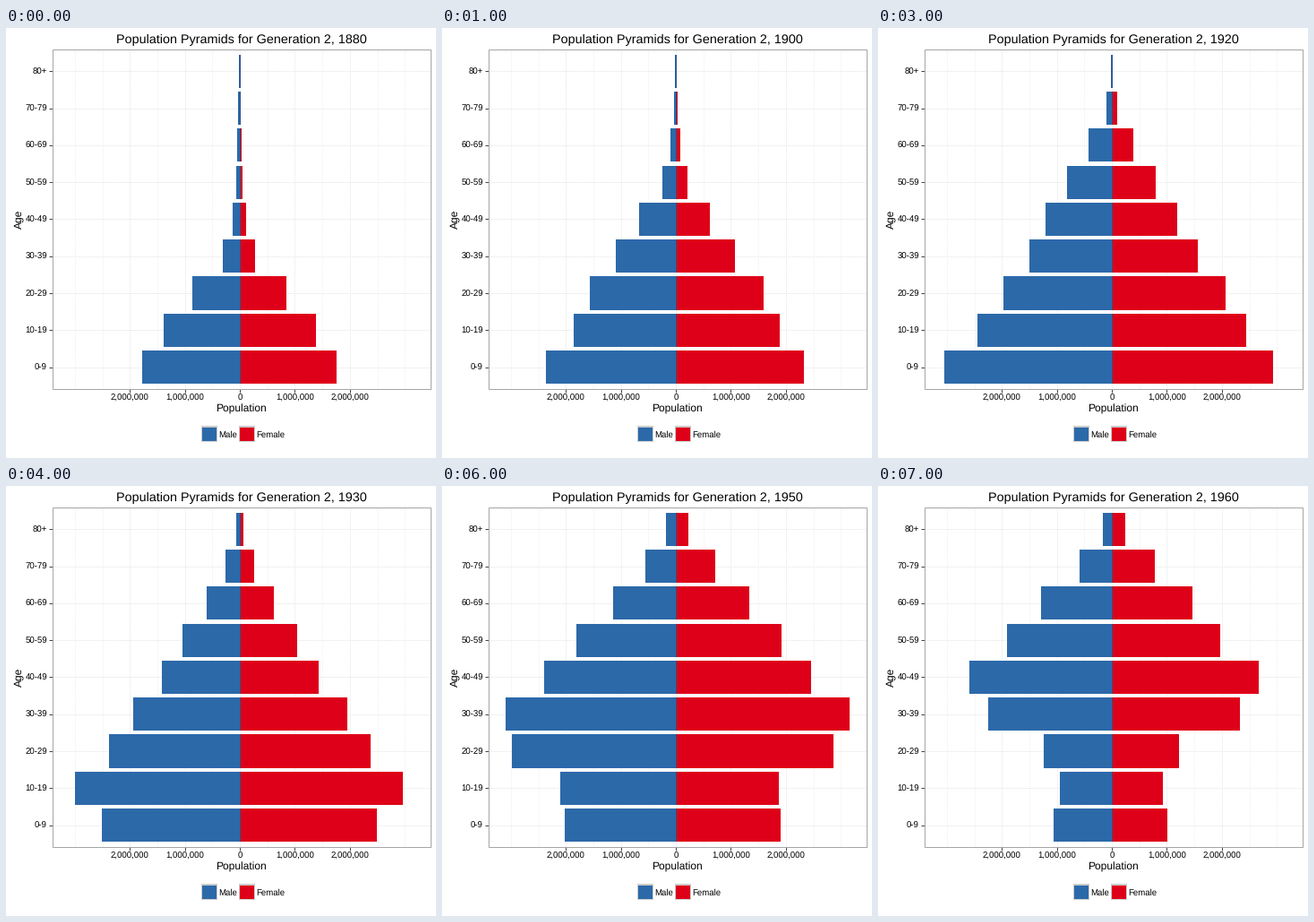
Write a matplotlib script that moves like this. It is 480 px wide and 480 px high and loops after 8 s.

```python
import matplotlib.pyplot as plt
from matplotlib.animation import FuncAnimation
from matplotlib.patches import Rectangle

plt.rcParams.update({
    "font.family": "Liberation Sans",
    "text.hinting": "none",
    "toolbar": "None",
})

SIZE, DPI = 480, 72          # at 72 dpi one point is one pixel
BLUE, RED, SEAM = "#2c69a9", "#de0018", "#2f4f86"
LEFT, RIGHT, TOP, BOTTOM = 52, 473.5, 23.5, 403
ZERO, MILLION = 261, 61.4
ROW, BAR = 41.28, 37.15
AGES = ["0-9", "10-19", "20-29", "30-39", "40-49",
        "50-59", "60-69", "70-79", "80+"]

# Bar lengths in pixels, youngest first: (male, female)
CENSUS = {
    1880: ([109, 85, 53, 19, 8, 4, 3, 2, 1],
           [108, 85, 52, 17, 7, 3, 2, 1, 1]),
    1900: ([145, 114, 96, 67, 41, 15, 6, 2, 1],
           [143, 116, 98, 66, 38, 13, 5, 2, 1]),
    1920: ([187, 150, 121, 92, 74, 50, 26, 6, 1],
           [180, 150, 127, 96, 73, 49, 24, 6, 1]),
    1940: ([89, 155, 178, 142, 117, 82, 54, 24, 6],
           [86, 155, 180, 142, 114, 81, 56, 26, 7]),
    1950: ([124, 129, 183, 190, 147, 111, 70, 34, 11],
           [117, 115, 176, 194, 151, 118, 82, 44, 14]),
    1960: ([65, 58, 76, 138, 159, 117, 79, 36, 10],
           [62, 57, 75, 143, 164, 121, 90, 48, 15]),
}


def between(before, after, young):
    """Follow each cohort ten years on; the youngest rows are given."""
    ages = list(young)
    for i in range(len(young), 8):
        ages.append(round((before[i - 1] + after[i + 1]) / 2))
    ages.append(round((before[8] + after[8]) / 2))
    return ages


def fill_decade(year, young_male, young_female):
    pairs = zip(CENSUS[year - 10], CENSUS[year + 10],
                (young_male, young_female))
    CENSUS[year] = tuple(between(*p) for p in pairs)


fill_decade(1910, [158], [153])
fill_decade(1930, [154, 184], [153, 182])
YEARS = sorted(CENSUS)

fig = plt.figure(figsize=(SIZE / DPI, SIZE / DPI), dpi=DPI, facecolor="white")
ax = fig.add_axes([0, 0, 1, 1])
ax.set_xlim(0, SIZE)
ax.set_ylim(SIZE, 0)
ax.axis("off")


def line(x0, y0, x1, y1, color, width=1, dashes=None, z=1):
    style = (0, dashes) if dashes else "-"
    ax.plot([x0, x1], [y0, y1], color=color, lw=width, ls=style,
            solid_capstyle="butt", dash_capstyle="butt", zorder=z)


def box(x, y, w, h, color, z=3, **kw):
    patch = Rectangle((x, y), w, h, facecolor=color, lw=0, zorder=z, **kw)
    return ax.add_patch(patch)


def label(x, y, text, size, ha="center", **kw):
    return ax.text(x, y, text, fontsize=size, ha=ha, va="baseline",
                   color="black", **kw)


def row_y(i):
    return 378.5 - ROW * i


# Grid and x axis
for half in range(-6, 7):
    x = ZERO + half * MILLION / 2
    major = half % 2 == 0 and abs(half) < 6
    line(x, TOP, x, BOTTOM, "#e8e8e8" if major else "#f1f1f1",
         0.8, (2, 1))
    if major:
        line(x, BOTTOM, x, BOTTOM + 4, "#333333", 0.9)
        label(x, 416, f"{abs(half) * 500000:,}", 9.6)

# Rows and y axis
for i, age in enumerate(AGES):
    y = row_y(i)
    line(LEFT, y, RIGHT, y, "#e6e6e6", 0.8, (2, 1))
    line(LEFT - 4, y, LEFT, y, "#333333", 0.9)
    label(46, y + 3.5, age, 9.6, "right")

ax.add_patch(Rectangle((LEFT, TOP), RIGHT - LEFT, BOTTOM - TOP, fill=False,
                       edgecolor="#a6a6a6", lw=1, zorder=5))

label(262.5, 429, "Population", 12)
ax.text(17, 213.5, "Age", fontsize=12, rotation=90, color="black",
        ha="right", va="center", rotation_mode="default").set_x(20)

# Legend
for x, color, name in ((218, BLUE, "Male"), (260, RED, "Female")):
    box(x - 0.5, 444, 18, 18, "#cccccc")
    box(x + 1, 445.5, 15.5, 15.5, color, 4)
    label(x + 19.5, 457, name, 9.6, "left")

title = label(262.7, 17, "", 14.4)
males, females = [], []
for i in range(len(AGES)):
    y = row_y(i) - BAR / 2
    males.append(box(ZERO, y, 0, BAR, BLUE))
    females.append(box(ZERO, y, 0, BAR, RED))
    box(ZERO, y, 1, BAR, SEAM, 4)


def update(n):
    year = YEARS[n]
    title.set_text(f"Population Pyramids for Generation 2, {year}")
    for bar, size in zip(males, CENSUS[year][0]):
        bar.set_x(ZERO - size)
        bar.set_width(size)
    for bar, size in zip(females, CENSUS[year][1]):
        bar.set_width(size)
    return [title, *males, *females]


anim = FuncAnimation(fig, update, frames=len(YEARS), interval=1000,
                     init_func=lambda: update(0), repeat=True,
                     repeat_delay=0, blit=False)
plt.show()
```
